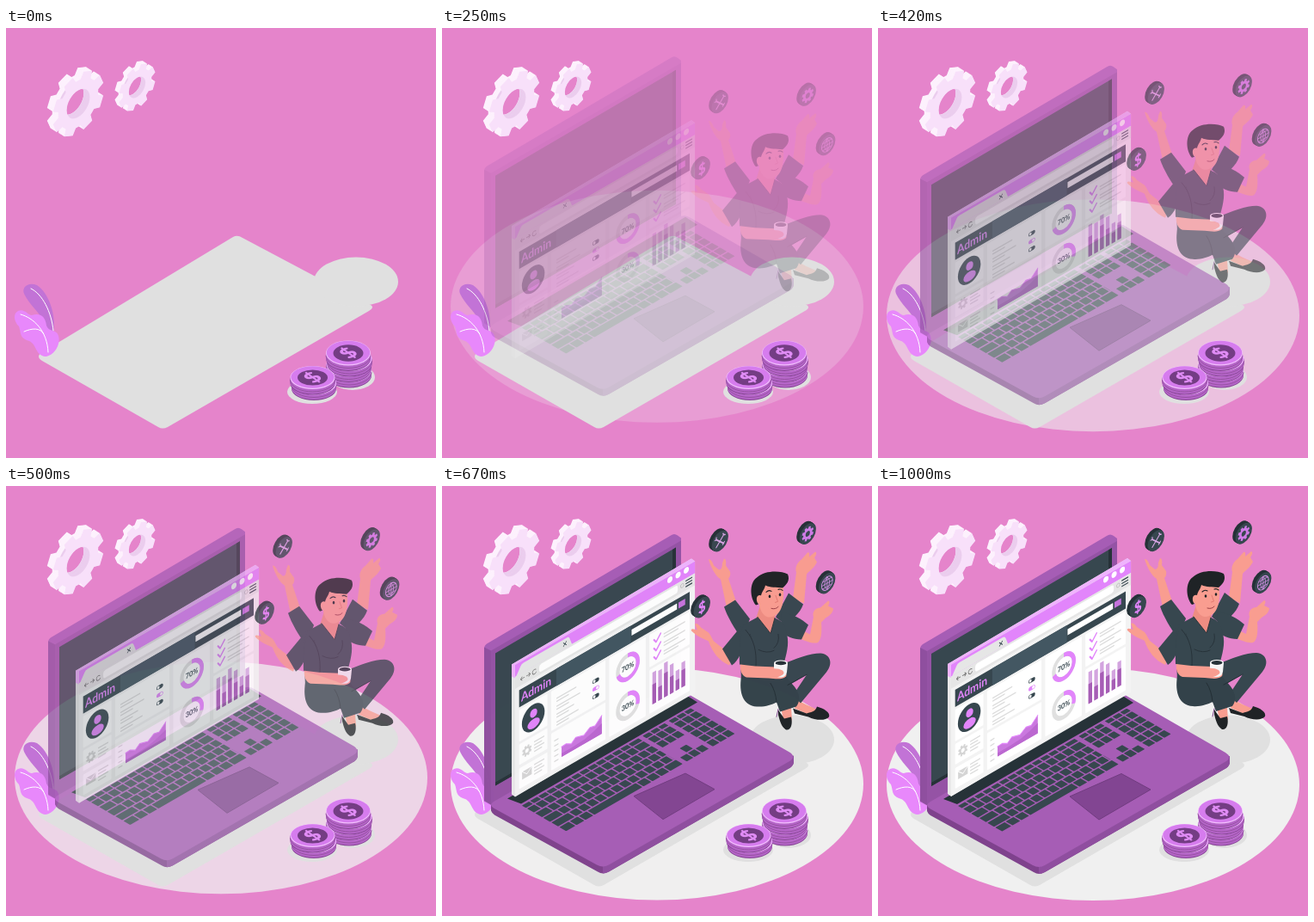
Animation, 500 px wide and 500 px high, one loop 1.04 s. Source, as an HTML page:

```html
<!DOCTYPE html>
<html lang="en">
<head>
<meta charset="utf-8">
<title>Admin juggling</title>
<style>
html, body { margin: 0; width: 100%; height: 100%; overflow: hidden; background: #e584cb; }
svg { display: block; width: 100vw; height: 100vh; }
text { font-family: Lato, "Open Sans", sans-serif; text-anchor: middle; }
</style>
</head>
<body>
<svg id="stage" viewBox="0 0 500 500"></svg>
<script>
const DARK = '#37474f', INK = '#263238', PURPLE = '#a65db5', PINK = '#e285fb',
      GREY = '#e0e0e0', SKIN = '#f99d90', BLACK = '#1f2326';

const path = (d, fill, more = '') => `<path d="${d}" fill="${fill}" ${more}/>`;
const line = (d, color, w = 1) => path(d, 'none', `stroke="${color}" stroke-width="${w}" stroke-linecap="round" stroke-linejoin="round"`);
const poly = (pts, fill) => `<polygon points="${pts}" fill="${fill}"/>`;
const oval = (x, y, rx, ry, fill) => `<ellipse cx="${x}" cy="${y}" rx="${rx}" ry="${ry}" fill="${fill}"/>`;
const rect = (x, y, w, h, fill, r = 0) => `<rect x="${x}" y="${y}" width="${w}" height="${h}" rx="${r}" fill="${fill}"/>`;
const ring = (x, y, r, color, w, more = '') => `<circle cx="${x}" cy="${y}" r="${r}" fill="none" stroke="${color}" stroke-width="${w}" ${more}/>`;
const text = (x, y, size, weight, fill, s) => `<text x="${x}" y="${y}" font-size="${size}" font-weight="${weight}" fill="${fill}">${s}</text>`;
const wall = (x, y, body) => `<g transform="matrix(.866 -.5 0 1 ${x} ${y})">${body}</g>`;
const ground = (x, y, body) => `<g transform="matrix(.866 -.5 .866 .5 ${x} ${y})">${body}</g>`;
const times = (n, f) => Array.from({ length: n }, (_, i) => f(i)).join('');

function cog(R, root, hole) {
  const pts = [];
  for (let i = 0; i < 8; i++) {
    const a = (i + .5) * Math.PI / 4;
    for (const [da, r] of [[-.27, root], [-.18, R], [.18, R], [.27, root]])
      pts.push((r * Math.cos(a + da)).toFixed(2) + ' ' + (r * Math.sin(a + da)).toFixed(2));
  }
  return `M${pts.join('L')}ZM${hole} 0A${hole} ${hole} 0 1 0 ${-hole} 0A${hole} ${hole} 0 1 0 ${hole} 0Z`;
}

function bigGear(x, y, s) {
  const d = cog(34.5, 27, 15.5), n = Math.round(14 * s);
  const back = f => times(n, i => wall(x - (n - i) * .5, y - (n - i) * .32, f));
  const rule = 'fill-rule="evenodd" stroke-linejoin="round"';
  return back(`<g transform="scale(${s})">${path(d, '#fdf1fd', rule)}</g>`) +
    back(ring(0, 0, 17 * s, '#ebcdee', 3 * s)) +
    wall(x, y, `<g transform="scale(${s})">${path(d, '#f8e0fa', rule)}</g>`);
}

function stack(x, y, n, ry) {
  const side = times(n, j => {
    const i = n - 1 - j, cx = x + [0, 1.5, .5, 1][i], cy = y + i * 6.5;
    const band = h => `M${cx - 26} ${cy}V${cy + h}A26 ${ry} 0 0 0 ${cx + 26} ${cy + h}V${cy}Z`;
    return path(band(6.5), '#8a4799') + path(band(5.4), '#b565c8') +
      line(`M${cx - 26} ${cy + 3}A26 ${ry} 0 0 0 ${cx + 26} ${cy + 3}`, '#93509f', .9) +
      oval(cx, cy, 26, ry, '#f3c0fe') + oval(cx, cy - .5, 25.2, ry - .8, '#d67cee');
  });
  return side + oval(x, y, 17.5, ry * .67, '#743d84') +
    ground(x, y, text(0, 8, 23, 900, '#e08cf5', '$'));
}

function shadows() {
  return path('M264 243Q269 240 275 244L358 288L424 322Q429 325 422 329L188 464Q182 467 177 464L42 387Q34 382 42 377Z', GREY) +
    oval(407, 295, 49, 28.5, GREY) + oval(356, 423, 29, 14, GREY) + oval(403, 406, 26, 15, GREY);
}

function plant() {
  return path('M55 355C59 335 50 308 36 299C26 295 18 301 21 309C26 320 38 330 42 338C46 346 49 352 55 355Z', '#c273d6') +
    line('M29 303C42 309 53 330 55 352', '#fff') +
    path('M46 382C34 381 36 368 27 364C15 360 18 355 15 347C9 341 8 332 14 329C22 326 25 334 30 334C38 331 46 334 47 346C50 354 59 350 61 358C64 368 56 381 46 382Z', '#e888fb') +
    line('M17 333C32 337 48 352 49 377M21 353C30 349 40 348 44 356', '#fff');
}

function keyboard() {
  const key = (x, y, w, h) => rect(x, y, w - 1.7, h - 1.7, DARK, .6);
  let out = '', y = 0;
  for (let r = 0; r < 6; r++) {
    const h = r ? 10.8 : 7;
    const first = [11, 11, 16, 19, 24, 14][r];
    const widths = r === 5 ? [14, 12, 12, 66, 12, 12, 12, 18]
      : [first, ...Array(12).fill(11), 158 - 132 - first];
    let x = 0;
    for (const w of widths) { out += key(x, y, w, h); x += w; }
    for (let c = 0; c < 3; c++) {
      if (r < 3 || r === 5 || (r === 4 && c === 1)) out += key(162 + c * 10.4, y, 10.4, h);
      out += key(197 + c * 10.4, y, 10.4, h);
    }
    y += h;
  }
  return ground(93, 372, out);
}

function laptop() {
  return path('M49 190Q49 186 52 184L266 58Q270 55 274 58L278 61V246L58 372L49 367Z', PURPLE) +
    poly('49,188 57,192 57,371 49,366', '#8f4f9f') +
    poly('57,192 278,64 278,246 57,371', '#9553a5') +
    poly('62,195 272,72 272,228 62,349', DARK) +
    poly('268,74.5 272,72 272,228 268,230', INK) +
    poly('62,345 272,224 272,228 62,349', INK) +
    path('M57 371V378Q58 381 61 383L181 449Q187 453 194 449L405 328Q409 325 409 321V314L187 440Z', '#7f428d') +
    path('M187 440L409 314V321Q409 325 405 328L194 449Q190 451 187 451Z', '#8f4e9f') +
    path('M61 367L278 242Q284 240 289 244L404 310Q412 315 405 320L194 441Q187 445 180 441L60 375Q54 371 61 367Z', PURPLE) +
    poly('76,364 92,370 297,252 283,243', INK) +
    keyboard() +
    path('M223 361L283 334.5L317 353L257 388Z', '#824592', 'stroke="#713c80"');
}

function donut(y, share) {
  const c = 2 * Math.PI * 13.5;
  return ring(156, y, 13.5, GREY, 5) +
    ring(156, y, 13.5, PINK, 5, `stroke-dasharray="${c * share} ${c}" transform="rotate(-90 156 ${y})"`) +
    text(156, y + 3, 8.5, 700, DARK, share * 100 + '%');
}

function dashboard() {
  const card = (x, y, w, h) => rect(x, y, w, h, '#fff', 1);
  const dash = (x, y, w) => rect(x, y, w, 1.5, '#dcdcdc', .7);
  const tops = [104, 106, 101, 107, 118, 112], splits = [118, 125, 113, 121, 129, 121];
  const chart = 'M67 129.5L73 129L80 132.5L86 128L97 131L105 126L112 127.5L121 120';
  const chrome = rect(4.6, 3, 241.4, 153, '#f3f3f3') + rect(4.6, 3, 241.4, 14, PINK) +
    rect(4.6, 17, 241.4, 14, '#e6e6e6') + path('M6 17L12 8Q13 6 16 6H74Q77 6 78 9L81 17Z', '#e6e6e6') +
    times(3, i => oval(212.5 + i * 11, 7.8, 3.5, 3.5, '#fff')) +
    line('M69.5 10L73.5 14M73.5 10L69.5 14', DARK, .9) +
    line('M17 23.5H12M14 21.5L12 23.5L14 25.5M20 23.5H25M23 21.5L25 23.5L23 25.5M32.5 22A2.7 2.7 0 1 0 33 25', '#777', .9) +
    rect(37, 19, 186, 9, '#fff', 3) + ring(229, 23, 2.2, '#bbb', .8) +
    line('M234 20H242M234 23.3H242M234 26.6H242', DARK, 1.3) +
    rect(10, 35, 229, 20, DARK) + rect(60, 35, 100, 20, '#435762') +
    text(33, 50, 14, 700, PINK, 'Admin') + rect(161, 40, 61, 7, '#fff') + rect(224, 40, 9, 7, '#c573dc');
  const left = card(10, 58, 38, 37) + card(10, 98, 38, 24) + card(10, 126, 38, 24) +
    oval(29, 76.5, 15.3, 15.3, DARK) + oval(29.5, 71.5, 4.8, 4.8, PINK) + oval(29.5, 83.5, 8.3, 5.5, PINK) +
    `<g transform="translate(20.5 110.5)">${path(cog(6.5, 4.8, 2.4), '#d5d5d5', 'fill-rule="evenodd"')}</g>` +
    rect(14, 132, 13, 9, '#d5d5d5') + line('M14 132L20.5 137.5L27 132', '#fff', .9) +
    times(4, i => dash(30, 104.5 + i * 3.7, 14 - i % 2 * 3) + dash(30, 131 + i * 3.7, 14 - i % 2 * 3));
  const middle = card(53, 58, 73, 46) + card(53, 107, 73, 43) +
    times(4, i => dash(60, 69 + i * 9.2, [27, 32, 24, 30][i]) + dash(60, 72.5 + i * 9.2, 17)) +
    times(3, i => rect(108.5, 73 + i * 9, 9, 4.6, i === 1 ? PINK : DARK, 2.3) +
      oval(i === 1 ? 115 : 111, 75.3 + i * 9, 1.7, 1.7, '#fff')) +
    times(5, i => dash(57, 117 + i * 6, 6)) +
    path(chart + 'V141H67Z', '#ca78df') + path('M67 137L82 137L98 136L110 133L121 129V141H67Z', '#bb68d0') +
    line(chart, PINK, 1.2);
  const right = card(131, 58, 49, 92) + card(185, 58, 54, 38) + card(185, 99, 54, 51) +
    donut(81, .7) + donut(126, .3) +
    times(3, i => line(`M191 ${67 + i * 10}L194 ${71 + i * 10}L200 ${64 + i * 10}`, PINK, 1.9) +
      dash(204, 66 + i * 10, 29) + dash(204, 69.5 + i * 10, 20)) +
    times(6, i => rect(189 + i * 7.8, tops[i], 5, 141 - tops[i], '#d3a4df') +
      rect(189 + i * 7.8, splits[i], 5, 141 - splits[i], PURPLE));
  return poly('81,207 290,84 294,87 294,237 85,361 81,358', '#e9e9e9') +
    poly('81,207 290,84 294,87 85,209 85,223 81,221', '#efb3fd') +
    wall(81, 207, chrome + left + middle + right);
}

function backArms() {
  return path('M331 141L324 108C318 104 313 95 310 85Q313 84 316 92L322 97Q326 97 326 89L328 84Q331 84 330 92L335 99Q336 104 333 107L342 134Z', SKIN) +
    path('M328 140L341 132L358 154L349 178C340 165 332 152 328 140Z', DARK) +
    path('M408 130L412 100C410 95 413 88 418 85L425 77Q428 76 427 82L434 76Q437 77 433 83L436 88C432 96 427 98 424 102L421 136Z', SKIN) +
    path('M403 124L420 137C416 148 408 154 398 160L388 152Z', DARK) +
    path('M416 166L428 172L432 152C430 146 434 141 440 141L449 133Q452 133 449 139L455 142Q455 148 446 153L441 158C442 170 441 180 436 182C430 183 424 180 416 177Z', SKIN) +
    path('M394 146C408 148 418 154 426 161L418 178C408 178 400 174 396 170Z', DARK) +
    path('M334 208C322 203 314 192 310 180C304 177 296 174 290 168Q289 165 293 166L297 167L294 160Q297 158 301 164L310 170C313 174 314 177 316 180L330 191L338 198Z', SKIN) +
    path('M350 160L326 189L337 208C345 203 350 190 353 176Z', DARK);
}

function head() {
  return path('M370 138L388 146L387 155L382 173L365 154Z', '#ee8d82') +
    path('M368 122C367 140 372 153 382 152C393 150 398 140 397 118L390 111L372 114Z', SKIN) +
    oval(367, 131, 4.5, 5.5, SKIN) +
    path('M365 138C358 130 357 112 366 106C376 97 394 98 402 102C405 109 401 114 396 118C388 117 382 118 376 115C375 120 372 122 371 127C366 125 364 132 368 137Z', BLACK) +
    oval(381, 128, 1.3, 1.8, BLACK) + oval(393, 126, 1.3, 1.8, BLACK) +
    line('M377 123Q380 120 383 122M391 120Q394 119 396 121', BLACK, 1.1) +
    line('M388 127L390.5 134L387.5 135', '#e0786f', .9) + line('M383 142Q388 143.5 391 140', '#9b3f45', 1);
}

function person() {
  return backArms() + head() +
    path('M367 152L382 171L387 153C395 156 399 160 400 168C404 180 402 190 398 204L399 212L348 226L347 200C346 185 345 168 352 160Z', DARK) +
    line('M367 152L382 171L387 153M358 172Q364 185 362 204M391 172Q393 182 386 188M368 190Q378 195 386 191', INK, .9) +
    path('M394 257H406L407 272H397Z', SKIN) + path('M411 247L424 254L440 261L430 267L410 258Z', SKIN) +
    path('M391 260L398 270L406 268C408 276 406 284 400 283C394 279 393 272 391 266Z', BLACK) + line('M391 259L389 268', '#7d4389', 1) +
    path('M408 258L424 264C430 262 434 262 436 256C444 258 452 263 450 268C446 273 434 272 426 268L410 264Z', BLACK) +
    path('M393 208C412 200 428 194 440 194C452 195 455 206 447 216L417 252L408 243L424 219L402 232L370 226Z', DARK) +
    path('M348 221C345 240 350 255 366 256C374 257 383 254 389 251L393 262L412 256C417 250 416 241 410 233L398 219Z', '#33424a') +
    line('M382 229Q388 238 389 251M402 231L424 219', '#222d33', .9) +
    path('M353 165C362 175 366 190 365 210L346 207C346 190 345 172 353 165Z', DARK) + line('M353 167C363 178 366 192 365 209', INK, .9) +
    path('M347 207L364 209L388 210C398 212 402 217 400 221C394 226 386 223 380 223L354 222C348 220 346 212 347 207Z', SKIN) +
    path('M386 206V216Q387 222 393 222Q400 222 401 216L402 206Z', '#f5f5f5') +
    oval(394, 205.5, 8, 3.4, '#fff') + oval(394, 205.5, 6.4, 2.4, INK) +
    path('M382 212Q391 211 396 214Q399 217 396 219Q390 223 382 222Z', SKIN);
}

function disc(x, y, icon) {
  return times(4, i => wall(x - 2 + i * .8, y - 1.5 + i * .5, oval(0, 0, 11.3, 11.3, INK))) +
    wall(x + 1.3, y + .7, oval(0, 0, 11.1, 11.1, DARK) + icon);
}

function icons() {
  const tools = line('M-5 -4L5 5M5 -5L-5 5', '#d9a6e6', 1.5) + line('M-7 -4L-5 -4L-5 -6.5M7 -4L5 -5L4 -7M3.5 6L6 3.5', '#d9a6e6', 1.3);
  const gear = path(cog(8, 6, 3), '#d07be8', 'fill-rule="evenodd"');
  const globe = ring(0, 0, 7.4, '#cf8fe2', 1) + line('M-7.4 0H7.4M0 -7.4V7.4M-6 -4H6M-6 4H6M0 -7.4Q-7 0 0 7.4Q7 0 0 -7.4', '#cf8fe2', .8);
  return disc(322, 63, tools) + disc(424, 54.5, gear) + disc(446.5, 112, globe) +
    disc(301, 140, text(0, 6, 17, 900, PINK, '$'));
}

// Each moving part fades in while sliding from `from` pixels below its place.
const slide = (from, body) => `<g class="slide" data-from="${from}" opacity="0">${body}</g>`;
document.getElementById('stage').innerHTML =
  slide(-30, oval(250, 347, 240, 135, '#f0f0f0')) +
  shadows() + plant() + bigGear(84, 88, 1) + bigGear(152.5, 69, .72) +
  stack(398, 378, 4, 14.5) + stack(356.5, 406.5, 2, 13.5) +
  slide(-30, laptop()) + slide(30, dashboard()) + slide(30, person()) + slide(30, icons());

const parts = document.querySelectorAll('.slide');
const LOOP = 1040, STEP = 1000 / 24;

// cubic-bezier(.36, -.01, .5, 1.38)
function ease(x) {
  const curve = (a, b, t) => 3 * a * t * (1 - t) ** 2 + 3 * b * t * t * (1 - t) + t ** 3;
  let lo = 0, hi = 1;
  for (let i = 0; i < 30; i++) {
    const mid = (lo + hi) / 2;
    if (curve(.36, .5, mid) < x) lo = mid; else hi = mid;
  }
  return curve(-.01, 1.38, lo);
}

const start = performance.now();
function draw() {
  const t = (performance.now() - start) % LOOP;
  const tick = Math.floor((Math.floor(t / 10) * 10 + 5) / STEP);
  const p = ease(Math.min(1, tick / 24));
  for (const g of parts) {
    g.setAttribute('opacity', Math.max(0, Math.min(1, p)));
    g.setAttribute('transform', `translate(0 ${(g.dataset.from * (1 - p)).toFixed(3)})`);
  }
  requestAnimationFrame(draw);
}
draw();
</script>
</body>
</html>
```
